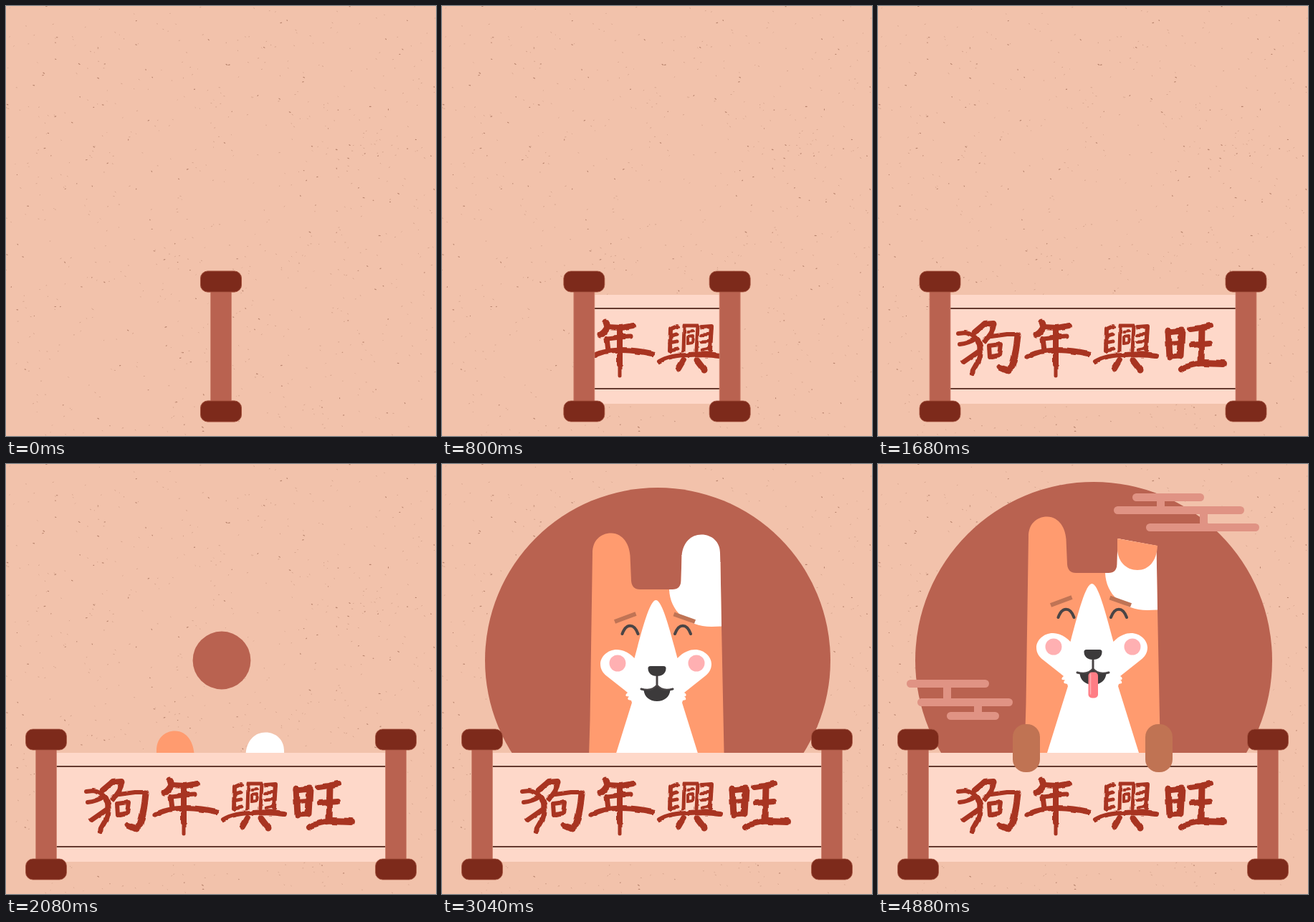
Animation, 600 px wide and 600 px high, one loop 8 s. Source, as an HTML page:

```html
<!DOCTYPE html>
<html lang="zh-Hant">
<head>
<meta charset="utf-8">
<title>狗年興旺</title>
<style>
  html, body { margin: 0; width: 100%; height: 100%; overflow: hidden; background: #f2c2ab; }
  svg { display: block; width: 100%; height: 100%; }
</style>
</head>
<body>
<svg viewBox="0 0 600 600">
  <defs>
    <clipPath id="above"><rect width="600" height="403"/></clipPath>
    <clipPath id="open"><rect id="window" y="403" height="152"/></clipPath>
    <filter id="brush" x="-5%" y="-10%" width="110%" height="120%" color-interpolation-filters="sRGB">
      <feTurbulence type="fractalNoise" baseFrequency=".09" numOctaves="1" seed="4"/>
      <feDisplacementMap in="SourceGraphic" scale="4" xChannelSelector="R" yChannelSelector="G"/>
    </filter>
    <g id="roller">
      <rect x="-14.5" y="390" width="29" height="170" fill="#b96250" stroke="#cf8470" stroke-width=".8"/>
      <g fill="#7d2a1b" stroke="#a5533f" stroke-width=".8">
        <rect x="-28.5" y="370" width="57" height="29" rx="10"/>
        <rect x="-28.5" y="551" width="57" height="29" rx="10"/>
      </g>
    </g>
  </defs>

  <rect width="600" height="600" fill="#f2c2ab"/>
  <g id="specks" fill="none" stroke="#96604a" stroke-linecap="round"></g>
  <circle id="sun" cx="301" cy="274" fill="#b96250"/>

  <g clip-path="url(#above)">
    <g id="dog">
      <path fill="#ff9b6f" d="M204.500 403L206.500 335L210 101C210 84 221 73.500 236 73.500C251 73.500 261 87 262.500 105L264 140Q265 152 276 152H322Q333 152 333.500 140L334.500 104L388.500 114L390 203L394 403Z"/>
      <path fill="#fff" d="M317 152H322Q333 152 333.500 140L334.500 104L388.500 114L390 203.500L376 204C342 204 318 182 317 152Z"/>
      <g id="ear">
        <path id="tip" fill="#fff" d="M334.600 105C336 87 347 75.500 362 75.500C377 75.500 388 86 388 101L388.400 115Z"/>
        <path id="flap" fill="#ff9b6f" d="M334 104L390 114C389 135 378 148 362 148C346 148 335 136 334 120Z"/>
      </g>
      <path fill="#fff" d="M298.500 167C290 167 280 205 268.500 248C260 239 251 236 244 236C231 236 221 246 221 256C221 264 225 269 230 273L259 296Q255 299 257 301L261 301.500Q258 304 260 306L264 307L265 310L236 403H364L335 310L336 307L340 306Q341 303 338 301.500L340 301Q342 298 338 296L367 273C372 269 376 264 376 256C376 246 366 236 353 236C346 236 337 239 328.500 248C317 205 307 167 298.500 167Z"/>
      <g fill="#ffb0b2"><circle cx="245" cy="255" r="11.500"/><circle cx="355" cy="255" r="11.500"/></g>
      <g fill="none" stroke="#4a4546" stroke-width="4" stroke-linecap="round">
        <path d="M251.500 214C257 199 268 199 273.500 214M325 214C330.500 199 341.500 199 347 214"/>
        <path stroke-width="3" d="M300 272V286M278 291Q293 295 300 286Q307 295 322 291"/>
      </g>
      <path fill="none" stroke="#c07455" stroke-width="6" d="M241 197L270.500 186M323.500 186.500L353 197"/>
      <path fill="#3c3a3b" d="M291 259H309Q313 259 312.500 263C312 270 306 273 300 273C294 273 288 270 287.500 263Q287 259 291 259ZM281.500 292Q293 295 300 287Q307 295 318.500 292C318 302 310 308 300 308C290 308 282 302 281.500 292Z"/>
      <g id="tongue">
        <rect id="lick" x="293.500" y="290.500" width="13.500" rx="5" fill="#ff7d85"/>
        <path id="shine" stroke="#ffb0b2" stroke-width="1.500" stroke-linecap="round"/>
      </g>
    </g>
  </g>

  <g clip-path="url(#open)">
    <rect y="403" width="600" height="152" fill="#fed8c9"/>
    <path stroke="#643a2f" stroke-width="2" d="M0 422H600M0 534H600"/>
    <g id="words" role="img" aria-label="狗年興旺" fill="none" stroke="#a83421" stroke-linecap="round" stroke-linejoin="round" filter="url(#brush)"></g>
  </g>
  <use id="left" href="#roller"/>
  <use id="right" href="#roller"/>

  <g id="cloudL" fill="#e09384"></g>
  <g id="cloudR" fill="#e09384"></g>
  <g id="paws" fill="#c07353">
    <rect x="188" width="38" height="67" rx="18"/>
    <rect x="373" width="38" height="67" rx="18"/>
  </g>
</svg>
<script>
const LOOP = 8000, STEP = 80;
const $ = id => document.getElementById(id);
const set = (id, attrs) => { for (const k in attrs) $(id).setAttribute(k, attrs[k]); };
const show = (id, on) => set(id, { visibility: on ? 'visible' : 'hidden' });
const progress = (t, from, to) => Math.min(1, Math.max(0, (t - from) / (to - from)));

// Brush strokes: width, path
const glyphs = {
  狗: [
    [8, 'M161 443L148 444L135 455'], [6, 'M112 457L122 456Q133 458 139 466'],
    [6, 'M137 464Q126 471 114 472'], [8, 'M139 466Q146 480 140 496L131 512'],
    [7, 'M139 483L119 497'], [7, 'M162 444Q160 458 149 467'],
    [6, 'M158 461L180 458L195 458'], [9, 'M195 459Q193 485 187 503L181 509L170 504'],
    [6, 'M155 474L171 472L169 487L156 490Z']
  ],
  年: [
    [9, 'M229 441L231 448Q227 456 221 459'], [8, 'M231 448L250 449L267 446'],
    [7, 'M231 464L248 462L262 461'], [7, 'M230 464L232 481'],
    [7, 'M208 490Q222 481 248 480'], [8, 'M248 480Q270 480 293 485'],
    [8, 'M248 450L248 500'], [5, 'M248 500L248 515']
  ],
  興: [
    [6, 'M328 447L319 451L318 481'], [5, 'M319 460L328 458M318 470L328 468M318 481L329 479'],
    [5, 'M338 447L337 481M338 446L357 446L355 481'],
    [4, 'M343 455L351 454M343 462L350 461L349 470L343 471Z'],
    [6, 'M363 448L376 447L374 480'], [4.5, 'M362 459L374 458M362 469L373 468M362 480L373 478'],
    [6, 'M303 496Q318 487 345 487'], [8, 'M345 487Q370 485 388 488'],
    [8, 'M337 494L330 506'], [9, 'M356 495L366 508']
  ],
  旺: [
    [9, 'M405 453L407 490'], [9, 'M405 455L424 453L422 488'],
    [6, 'M408 471L421 470'], [7, 'M407 489L422 488'],
    [8, 'M436 451L450 449L464 446'], [9, 'M452 449L451 498'],
    [8, 'M438 473L463 471'], [8, 'M423 507Q434 500 455 498'], [10, 'M455 498L482 499']
  ]
};
$('words').innerHTML = Object.values(glyphs).flat()
  .map(([w, d]) => `<path stroke-width="${w}" d="${d}"/>`).join('');

// Clouds: x, y, width, height; bars are rounded, links are square
const bar = ([x, y, w, h]) => `<rect x="${x}" y="${y}" width="${w}" height="${h}" rx="${w > 20 ? h / 2 : 0}"/>`;
$('cloudL').innerHTML = [[40, 301, 115, 11], [55, 327, 133, 11], [96, 346, 73, 11],
  [91, 311, 11, 17], [134, 337, 11, 10]].map(bar).join('');
$('cloudR').innerHTML = [[355, 41, 100, 11], [329, 59, 182, 11], [374, 83, 158, 11],
  [389, 51, 11, 9], [449, 69, 11, 15]].map(bar).join('');

let seed = 17;
const rand = () => (seed = (seed * 16807) % 2147483647) / 2147483647;
function speckle(count, size, opacity) {
  let d = '';
  for (let i = 0; i < count; i++) {
    const x = rand() * 600, y = rand() * 600;
    d += `M${x.toFixed(1)} ${y.toFixed(1)}l${(rand() * size).toFixed(1)} ${((rand() - .4) * size).toFixed(1)}`;
  }
  return `<path d="${d}" stroke-width="${size * .6}" opacity="${opacity}"/>`;
}
$('specks').innerHTML = speckle(650, 1.3, .4) + speckle(150, 1.9, .65);

const hinge = k => `translate(334 104) rotate(10.100) scale(1 ${k}) rotate(-10.100) translate(-334 -104)`;

function draw(t) {
  const gap = 244 * progress(t, 0, 1920);
  set('left', { x: 300 - gap });
  set('right', { x: 300 + gap });
  set('window', { x: 300 - gap, width: 2 * gap });

  const u = progress(t, 1920, 3120), v = 1 - u;
  set('sun', { r: 249 * (1.2 * u * v * v + 2.58 * u * u * v + u * u * u) });
  set('dog', { transform: `translate(0 ${345 * v})` });

  show('paws', t >= 3680);
  set('paws', { transform: `translate(0 ${336 + 27 * progress(t, 3680, 3920)})` });

  const fold = 1 - 2 * progress(t, 3840, 4080);
  show('tip', fold > 0);
  show('flap', fold < 0);
  set('ear', { transform: hinge(Math.abs(fold)) });

  show('cloudR', t >= 4160);
  show('cloudL', t >= 4400);

  const out = progress(t, 4560, 4880);
  show('tongue', out > 0);
  set('lick', { height: 36 * out });
  set('shine', { d: `M296.500 293V${293 + 28 * out}` });
}

const start = performance.now();
function frame() {
  const t = (performance.now() - start) % LOOP;
  draw(Math.floor(t / STEP) * STEP);
  requestAnimationFrame(frame);
}
frame();
</script>
</body>
</html>
```
